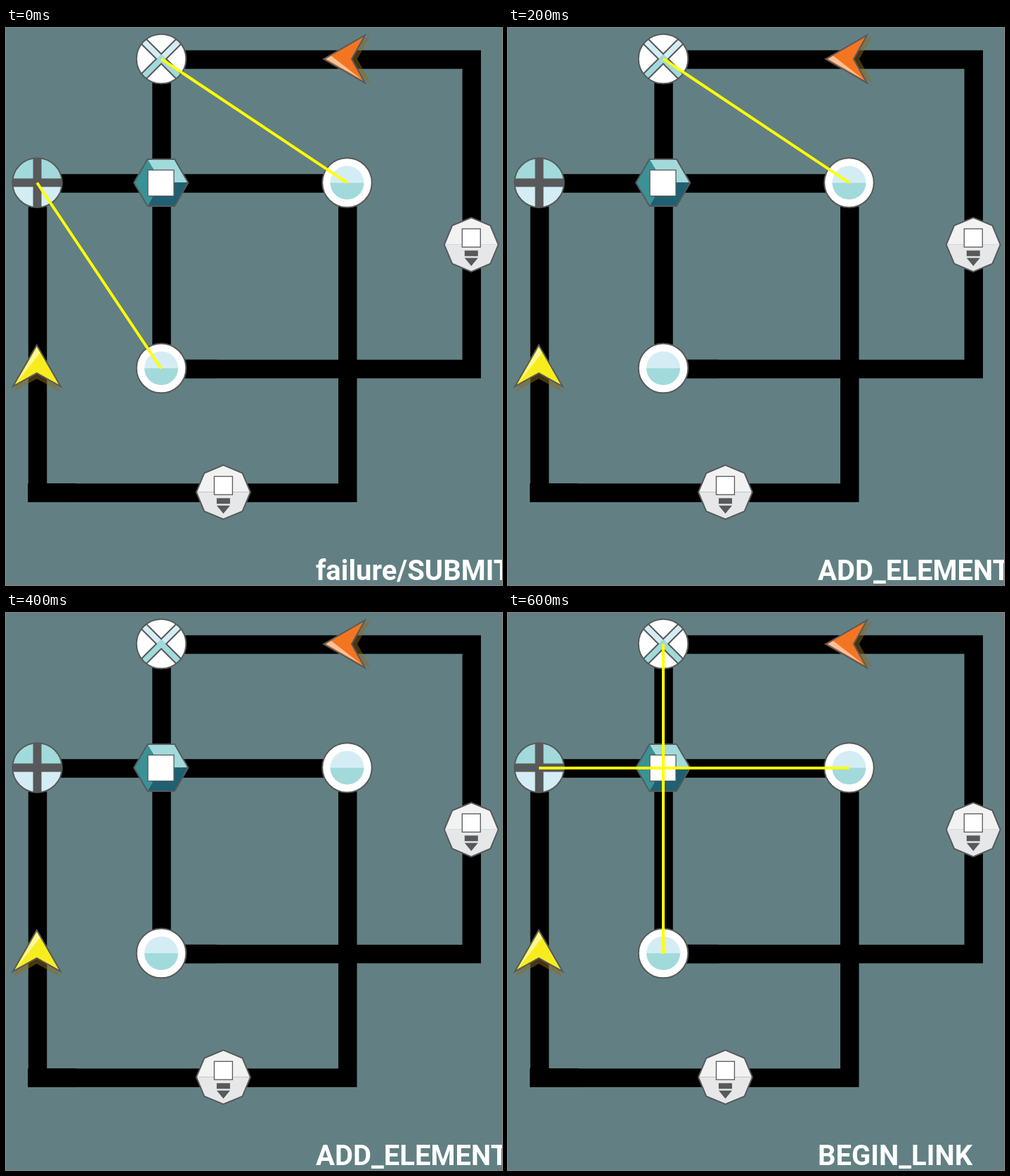
An HTML page for the animation above (700 ms loop, 706x794 px).

```html
<!DOCTYPE html>
<html lang="en">
<head>
<meta charset="utf-8">
<title>Link puzzle</title>
<style>
  html, body { margin: 0; width: 100%; height: 100%; overflow: hidden; background: #628083; }
  svg { display: block; }
  text { font: bold 40px Roboto, sans-serif; fill: #fff; }
  .edge { stroke: #58595b; stroke-width: 2; }
  .thin { stroke: #58595b; stroke-width: 1.3; fill: #fff; }
  .dark { fill: #58595b; }
  .pale { fill: #d4edf4; }
  .aqua { fill: #a2dadb; }
  .track { fill: none; stroke: #000; stroke-width: 26.5; }
  .link { stroke: #ff0; stroke-width: 4; }
</style>
</head>
<body>
<svg width="706" height="794" viewBox="0 0 706 794">
  <defs>
    <g id="ring">
      <circle r="35.3" fill="#fff" class="edge"/>
      <path d="M-24 0a24 24 0 0 1 48 0z" class="pale"/>
      <path d="M-24 0a24 24 0 0 0 48 0z" class="aqua"/>
    </g>
    <g id="drop">
      <path d="M0-38.5L27.2-27.2 38.5 0H-38.5L-27.2-27.2z" fill="#f2f2f3"/>
      <path d="M0 38.5L27.2 27.2 38.5 0H-38.5L-27.2 27.2z" fill="#e6e7e8"/>
      <path d="M0-38.5L27.2-27.2 38.5 0 27.2 27.2 0 38.5-27.2 27.2-38.5 0-27.2-27.2z" fill="none" class="edge"/>
      <rect x="-13" y="-22.5" width="26" height="26" class="thin"/>
      <path d="M-9.5 8.5h19v8h-19zM-9.5 19h19L0 30.5z" class="dark"/>
    </g>
    <g id="arrow">
      <path d="M0 8L34 67 0 48-34 67z" fill="#8f6a1c" opacity=".5"/>
      <path d="M0 0L34 59 0 40-34 59z" class="edge"/>
      <path d="M0 3.5L4.5 11-29 54z" fill="#fff" opacity=".55"/>
    </g>
    <clipPath id="disc"><circle r="35.3"/></clipPath>
  </defs>

  <g class="track">
    <rect x="221.5" y="45" width="441.3" height="441.1"/>
    <rect x="45" y="221.5" width="441.3" height="441.1"/>
    <path d="M207.4 486.1H300M31 662.6H100"/>
  </g>

  <g transform="translate(221 44)">
    <circle r="35.3" fill="#fff"/>
    <g clip-path="url(#disc)">
      <path d="M0 0L-40-40" stroke="#d4edf4" stroke-width="10"/>
      <path d="M0 0L40-40" stroke="#d4edf4" stroke-width="10"/>
      <path d="M-40 40L0 0 40 40" fill="none" stroke="#a2dadb" stroke-width="10"/>
      <path d="M-40-47L0-7 40-47M-40 47L0 7 40 47M-47-40L-7 0-47 40M47-40L7 0 47 40" fill="none" class="edge"/>
    </g>
    <circle r="35.3" fill="none" class="edge"/>
  </g>

  <g transform="translate(44.5 220.5)">
    <path d="M-35.3 0a35.3 35.3 0 0 1 70.6 0z" class="aqua"/>
    <path d="M-35.3 0a35.3 35.3 0 0 0 70.6 0z" class="pale"/>
    <path d="M-6-35H6V35H-6zM-35-6H35V6H-35z" class="dark"/>
    <circle r="35.3" fill="none" class="edge"/>
  </g>

  <g transform="translate(220.7 220.5)">
    <path d="M0 0L-19.3-33.5H19.3L38.6 0z" class="aqua"/>
    <path d="M0 0H38.6L19.3 33.5H-19.3z" fill="#1f6073"/>
    <path d="M0 0L-19.3 33.5-38.6 0-19.3-33.5z" fill="#3a9295"/>
    <path d="M-38.6 0L-19.3-33.5H19.3L38.6 0 19.3 33.5H-19.3z" fill="none" class="edge"/>
    <rect x="-18.7" y="-18" width="37" height="37" class="thin"/>
  </g>

  <use href="#drop" x="662.3" y="308.8"/>
  <use href="#drop" x="309.4" y="661.7"/>
  <use href="#arrow" transform="translate(43.8 452)" fill="#f7ed1e"/>
  <use href="#arrow" transform="translate(452 44.3) rotate(-90)" fill="#f47521"/>

  <use id="rightRing" href="#ring" x="485.5" y="220.5"/>
  <use id="lowRing" href="#ring" x="221" y="485"/>
  <g class="link">
    <path id="crossRight" d="M221 44L485.7 220.7"/>
    <path id="plusLow" d="M44.2 220.7L221 485.7"/>
    <path id="plusRight" d="M44 221H486"/>
    <path id="crossLow" d="M221 44V486"/>
  </g>
  <text id="label" x="441" y="787"></text>
</svg>
<script>
const STEP = 100;
const toggles = ["rightRing", "lowRing", "crossRight", "plusLow", "plusRight", "crossLow"];
const steps = [
  ["failure/SUBMIT", "rightRing lowRing crossRight plusLow"],
  ["REMOVE_ELEMENT", "rightRing crossRight"],
  ["ADD_ELEMENT", "rightRing lowRing crossRight"],
  ["REMOVE_ELEMENT", "lowRing"],
  ["ADD_ELEMENT", "rightRing lowRing"],
  ["BEGIN_LINK", "rightRing lowRing plusRight"],
  ["BEGIN_LINK", "rightRing lowRing plusRight crossLow"]
];
const byId = id => document.getElementById(id);
const start = performance.now();

function draw(now) {
  const elapsed = Math.max(0, now - start);
  const [message, shown] = steps[Math.floor(elapsed / STEP) % steps.length];
  const visible = shown.split(" ");
  byId("label").textContent = message;
  for (const id of toggles) {
    byId(id).style.display = visible.includes(id) ? "" : "none";
  }
  requestAnimationFrame(draw);
}
draw(start);
</script>
</body>
</html>
```
